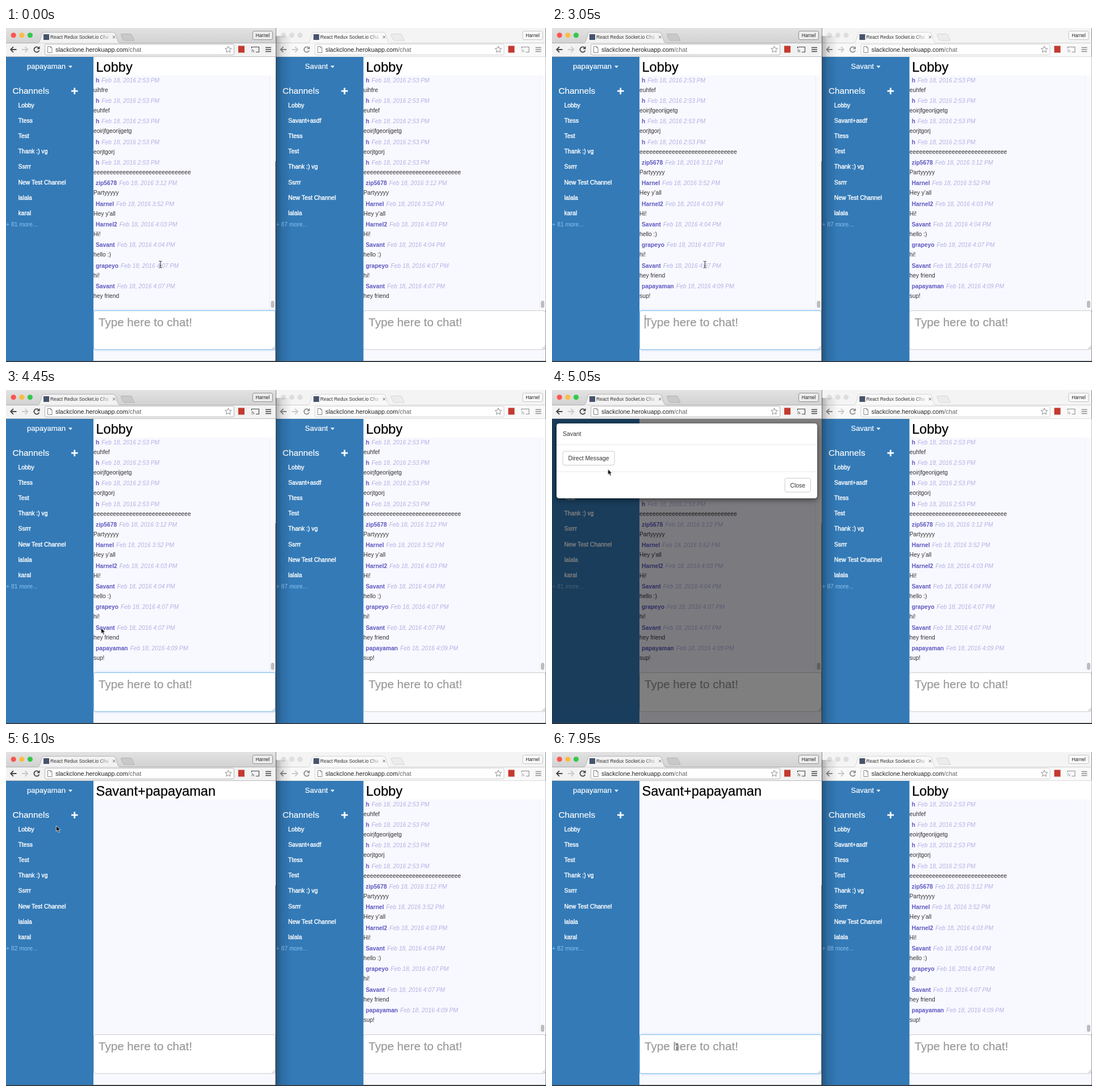
An HTML page for the animation above (8000 ms loop, 951x589 px).

```html
<!DOCTYPE html>
<html lang="en">
<head>
<meta charset="utf-8">
<title>Chat in two windows</title>
<style>
html, body { margin: 0; width: 100%; height: 100%; overflow: hidden; background: #1c2226; }
svg { display: block; width: 951px; height: 589px; font-family: "Liberation Sans", Arial, sans-serif; }
text { white-space: pre; }
.name { font-weight: bold; fill: #5d59c0; }
.date { font-style: italic; fill: #b3b1e3; }
.modal { animation: modal-fade 8s linear infinite, modal-slide 8s linear infinite; }
.panel { filter: drop-shadow(0 3px 5px rgba(0, 0, 0, .5)); }
.backdrop { animation: backdrop 8s linear infinite; }
.pointer { animation: pointer 8s ease-in-out infinite; }
.glow { filter: drop-shadow(0 0 2px rgba(102, 175, 233, .45)); }
</style>
</head>
<body>
<script>
const LOOP = 8000, SENT = 1650, SWITCHED = 5880;
const OWNER = 'Harnel', LEFT_USER = 'papayaman', RIGHT_USER = 'Savant';
const BODY = 10.3, MENU = 10.4;

const messages = [
  ['h', '2:53', 'uihfre'], ['h', '2:53', 'euhfef'], ['h', '2:53', 'eoirjfgeorijgetg'],
  ['h', '2:53', 'eorjtgorj'], ['h', '2:53', 'e'.repeat(30)],
  ['zip5678', '3:12', 'Partyyyyy'], [OWNER, '3:52', 'Hey y’all'], [OWNER + '2', '4:03', 'Hi!'],
  [RIGHT_USER, '4:04', 'hello :)'], ['grapeyo', '4:07', 'hi!'],
  [RIGHT_USER, '4:07', 'hey friend'], [LEFT_USER, '4:09', 'sup!'],
];
const channels = ['Lobby', 'Ttess', 'Test', 'Thank :) vg', 'Ssrrr', 'New Test Channel', 'lalala', 'karal'];

let css = '', spanCount = 0;
function keyframes(name, stops) {
  const body = stops.map(([ms, rule]) => `${ms / LOOP * 100}%{${rule}}`).join('');
  css += `@keyframes ${name}{${body}}`;
}

// Shows content only within the given [from, to] spans (ms).
function during(spans, content) {
  const name = 'span' + spanCount++;
  keyframes(name, [[0, 'opacity:0'],
    ...spans.flatMap(([from, to]) => [[from, 'opacity:1'], [to, to < LOOP ? 'opacity:0' : 'opacity:1']])]);
  return `<g style="animation:${name} 8s step-end infinite">${content}</g>`;
}
const until = (ms, content) => during([[0, ms]], content);
const after = (ms, content) => during([[ms, LOOP]], content);

const text = (x, y, size, str, attrs = '') => `<text x="${x}" y="${y}" font-size="${size}" ${attrs}>${str}</text>`;
const rect = (x, y, w, h, fill, attrs = '') => `<rect x="${x}" y="${y}" width="${w}" height="${h}" fill="${fill}" ${attrs}/>`;
const line = (d, color, width, attrs = '') => `<path d="${d}" fill="none" stroke="${color}" stroke-width="${width}" ${attrs}/>`;
const shape = (d, fill, attrs = '') => `<path d="${d}" fill="${fill}" ${attrs}/>`;

function browser(active) {
  const lights = active ? ['#fc5550', '#fdbc40', '#34c84a'] : ['#dedede', '#dedede', '#dedede'];
  const strip = active ? 'url(#strip)' : '#f4f4f4', bar = active ? '#f2f2f2' : '#f9f9f9';
  const edge = active ? '#ababab' : '#cfcfcf', icon = active ? '#444' : '#8c8c8c';
  const star = [...Array(10)].map((_, i) => {
    const r = i % 2 ? 2.8 : 6, a = i * Math.PI / 5;
    return `${(391.5 + r * Math.sin(a)).toFixed(1)},${(38 - r * Math.cos(a)).toFixed(1)}`;
  }).join(' ');
  return rect(0, 0, 475, 27, strip) + rect(0, 26, 475, 25, bar)
    + lights.map((c, i) => `<circle cx="${13.2 + i * 14.6}" cy="12.8" r="4.6" fill="${c}"/>`).join('')
    + line('M0 26.5H56M200 26.5H475', edge, 1)
    + shape('M55 27C59 26 59.5 23 61 18Q63.5 7.5 66 7.5H189Q192 7.5 194 13C196 20 197 26 201 27Z', bar, `stroke="${edge}" stroke-width=".8"`)
    + rect(50, 27, 160, 2, bar)
    + shape('M204 10.5H219Q221 10.5 222 13L226 22H209Q207 22 206 20L202.5 12Q202.5 10.5 204 10.5Z', active ? '#c9c9c9' : '#ececec', `stroke="${edge}" stroke-width=".8"`)
    + rect(66, 11, 10, 10, '#46536b')
    + text(78, 19.2, 8.4, 'React Redux Socket.io Cha', 'fill="url(#title-fade)"')
    + line('M188 13.7L192.6 18.3M192.6 13.7L188 18.3', '#666', 1)
    + rect(434.5, 5.5, 35, 15, active ? '#ececec' : '#fafafa', `rx="2.5" stroke="${active ? '#929292' : '#c4c4c4'}"`)
    + text(452, 16, 8.4, OWNER, 'text-anchor="middle" fill="#222"')
    + line('M18.5 38H8.5M13 33.2L8.2 38L13 42.8', icon, 1.9)
    + line('M28 38H38M33.5 33.2L38.3 38L33.5 42.8', '#c9c9c9', 1.9)
    + line('M57.5 35A4.6 4.6 0 1 0 58.4 39.5', icon, 1.8) + shape('M59.5 32V37.2H54.3Z', icon)
    + rect(68.5, 28.5, 333, 19, '#fff', `rx="2.5" stroke="${active ? '#b4b4b4' : '#d0d0d0'}"`)
    + shape('M73.5 32.5H78.5L81 35V43.5H73.5ZM78.5 32.5V35H81', '#fff', 'stroke="#777" stroke-width=".9"')
    + text(87, 41.8, 10.8, 'slackclone.herokuapp.com<tspan fill="#666">/chat</tspan>', 'fill="#222"')
    + `<polygon points="${star}" fill="none" stroke="#8a8a8a"/>`
    + rect(409, 31.5, 11, 12, '#c4392f')
    + line('M432.5 36V33.5H445.5V42.5H440M432.5 38.5A4 4 0 0 1 436.5 42.5M432.5 41A2 2 0 0 1 434 42.5', icon, 1.1)
    + line('M457 34.5H467M457 38H467M457 41.5H467', icon, 1.7)
    + line('M0 50.5H475', active ? '#b8b8b8' : '#dadada', 1);
}

function sidebar(user, names, more, moreAt) {
  const bolder = width => `fill="#fff" stroke="#fff" stroke-width="${width}"`;
  const userWidth = user === LEFT_USER ? 68 : 40;
  const start = 77 - (userWidth + 12) / 2, tip = start + userWidth + 8.5;
  const count = n => text(0, 350, MENU, `+ ${n} more...`, 'fill="#8dc3f0"');
  return rect(0, 51, 154, 536.5, '#337ab7')
    + text(start, 72, 13, user, bolder(.2))
    + shape(`M${tip - 3.5} 66.5h7l-3.5 4z`, '#fff')
    + text(11.5, 116, 15.3, 'Channels', bolder(.2))
    + line('M115 111.2H126.5M120.7 105.5V117', '#fff', 2.8)
    + names.map((n, i) => text(21.5, 139.8 + i * 27.15, MENU, n, bolder(.4))).join('')
    + until(moreAt, count(more)) + after(moreAt, count(more + 1));
}

const messageList = first => messages.slice(first, first + 11).map(([who, time, body], i) => {
  const y = 95.8 + i * 36.33;
  return text(158, y, BODY, `<tspan class="name">${who}</tspan><tspan class="date" dx="4">Feb 18, 2016 ${time} PM</tspan>`)
    + text(154, y + 17, BODY, body, 'fill="#333"');
}).join('');

const history = sentAt => line('M464.5 84V497', '#ececf2', 1)
  + rect(465, 84, 10, 413, '#fafafe') + rect(466.5, 481, 6, 12.5, '#bdbdbf', 'rx="3"')
  + until(sentAt, messageList(0)) + after(sentAt, messageList(1));

const heading = str => text(158.5, 76.5, 23.6, str, 'stroke="#000" stroke-width=".25"');
const placeholder = text(163, 525.5, 20.6, 'Type here to chat!', 'fill="#999" stroke="#999" stroke-width=".2"');
const box = (color, attrs = '') => rect(154.5, 498.5, 320, 68.5, '#fff', `rx="3" stroke="${color}" ${attrs}`);
const grip = line('M468.5 566L474 560.5M471.5 566L474 563.5', '#999', .8);
const pageBase = rect(0, 51, 475, 536.5, '#f8f8ff') + rect(154, 51, 321, 33, '#fff');

function typedText() {
  const strokes = [700, 900, 1080, 1300, SENT];
  return [...'sup!'].map((_, i) =>
    during([[strokes[i], strokes[i + 1]]], text(163, 525.5, 20.6, 'sup!'.slice(0, i + 1), 'fill="#555"'))).join('');
}

const button = (x, y, w, label, attrs, fill = '#fff') => rect(x, y, w, 24.5, fill, `rx="3" ${attrs}`)
  + text(x + w / 2, y + 16, MENU, label, 'text-anchor="middle" fill="#333"');

function modal() {
  const plain = 'stroke="#ccc"', pressed = 'stroke="#4a8fd4" stroke-width="2.5"';
  return `<g class="modal">${rect(8, 59, 459, 132, '#fff', 'rx="4.5" class="panel"')}`
    + text(19, 81.3, MENU, RIGHT_USER, 'fill="#333"')
    + line('M8 96.5H467M8 144H467', '#e5e5e5', .9)
    + button(19, 108, 91, 'Direct Message', plain)
    + during([[5800, 6200]], button(19, 108, 91, 'Direct Message', pressed, '#dadada'))
    + button(410, 155.5, 45.5, 'Close', plain) + '</g>';
}

function leftPage() {
  const blinks = [SENT, 2650, 3650].map(ms => [ms, ms + 500]);
  return pageBase + sidebar(LEFT_USER, channels, 81, SWITCHED)
    + until(SWITCHED, heading('Lobby') + history(SENT))
    + after(SWITCHED, heading(`${RIGHT_USER}+${LEFT_USER}`))
    + box('#ccc') + during([[0, 4500], [7450, LOOP]], box('#7fbcec', 'class="glow"'))
    + during([[0, 700], [SENT, LOOP]], placeholder) + typedText()
    + during([...blinks, [7450, 7950]], line('M164 506V530', '#444', .9)) + grip
    + `<g class="backdrop">${rect(0, 51, 475, 536.5, '#000')}</g>` + modal();
}

function rightPage() {
  const names = [channels[0], RIGHT_USER + '+asdf', ...channels.slice(1, 7)];
  return pageBase + sidebar(RIGHT_USER, names, 87, 6150) + heading('Lobby') + history(1700)
    + box('#ccc') + placeholder + grip
    + during([[750, 2150]], text(157.5, 581.5, MENU, LEFT_USER + ' is typing', 'fill="#777"'));
}

function pointer() {
  const beam = 'M-2.5 -6Q0 -6 0 -4.5Q0 -6 2.5 -6M0 -4.5V4.5M-2.5 6Q0 6 0 4.5Q0 6 2.5 6M-1.5 2H1.5';
  const arrow = 'M0 0V10L2.3 8L4 12L5.8 11.2L4.2 7.4H7.2Z';
  return '<g class="pointer">'
    + during([[0, 650], [2900, 3950], [6650, LOOP]], line(beam, '#fff', 2, 'opacity=".6"') + line(beam, '#222', 1))
    + during([[3950, 6650]], shape(arrow, '#000', 'stroke="#fff" stroke-width=".8"')) + '</g>';
}

keyframes('modal-fade', [[0, 'opacity:0'], [4500, 'opacity:0'], [4650, 'opacity:1'],
  [5860, 'opacity:1'], [5950, 'opacity:.58'], [6030, 'opacity:0'], [LOOP, 'opacity:0']]);
const slide = y => `transform:translateY(${y}px)`;
keyframes('modal-slide', [[0, slide(-33)], [4500, slide(-33) + ';animation-timing-function:ease-out'], [4800, slide(0)],
  [5860, slide(0)], [5950, slide(-25)], [6050, slide(-33)], [LOOP, slide(-33)]]);
keyframes('backdrop', [[0, 'opacity:0'], [4500, 'opacity:0'], [4650, 'opacity:.5'],
  [5860, 'opacity:.5'], [5950, 'opacity:.29'], [6050, 'opacity:0'], [LOOP, 'opacity:0']]);
keyframes('pointer', [[0, 272, 417], [2900, 272, 417], [4200, 167.5, 419.5], [4600, 167.5, 419.5],
  [5000, 98.5, 139.5], [5050, 98.5, 139.5], [5350, 88.5, 130], [6150, 88.5, 130],
  [6750, 220, 517], [6950, 220, 517], [7400, 220, 520], [LOOP, 220, 520]]
  .map(([ms, x, y]) => [ms, `transform:translate(${x}px,${y}px)`]));

const scene = `<svg viewBox="0 0 951 589">
  <defs>
    <linearGradient id="strip" x2="0" y2="1"><stop stop-color="#e2e2e2"/><stop offset="1" stop-color="#d2d2d2"/></linearGradient>
    <linearGradient id="shadow"><stop stop-opacity=".3"/><stop offset=".4" stop-opacity=".1"/><stop offset="1" stop-opacity="0"/></linearGradient>
    <linearGradient id="title-fade"><stop offset=".82" stop-color="#333"/><stop offset="1" stop-color="#333" stop-opacity=".2"/></linearGradient>
    <clipPath id="page"><rect y="51" width="475.5" height="536.5"/></clipPath>
  </defs>
  <g transform="translate(475.5)">${browser(false)}<g clip-path="url(#page)">${rightPage()}</g></g>
  ${rect(475, 14, 28, 573.5, 'url(#shadow)')}
  ${browser(true)}<g clip-path="url(#page)">${leftPage()}</g>
  ${line('M475 235V587.5', '#2b3a46', 1)}
  ${pointer()}
</svg>`;

document.head.insertAdjacentHTML('beforeend', `<style>${css}</style>`);
document.body.insertAdjacentHTML('beforeend', scene);
</script>
</body>
</html>
```
